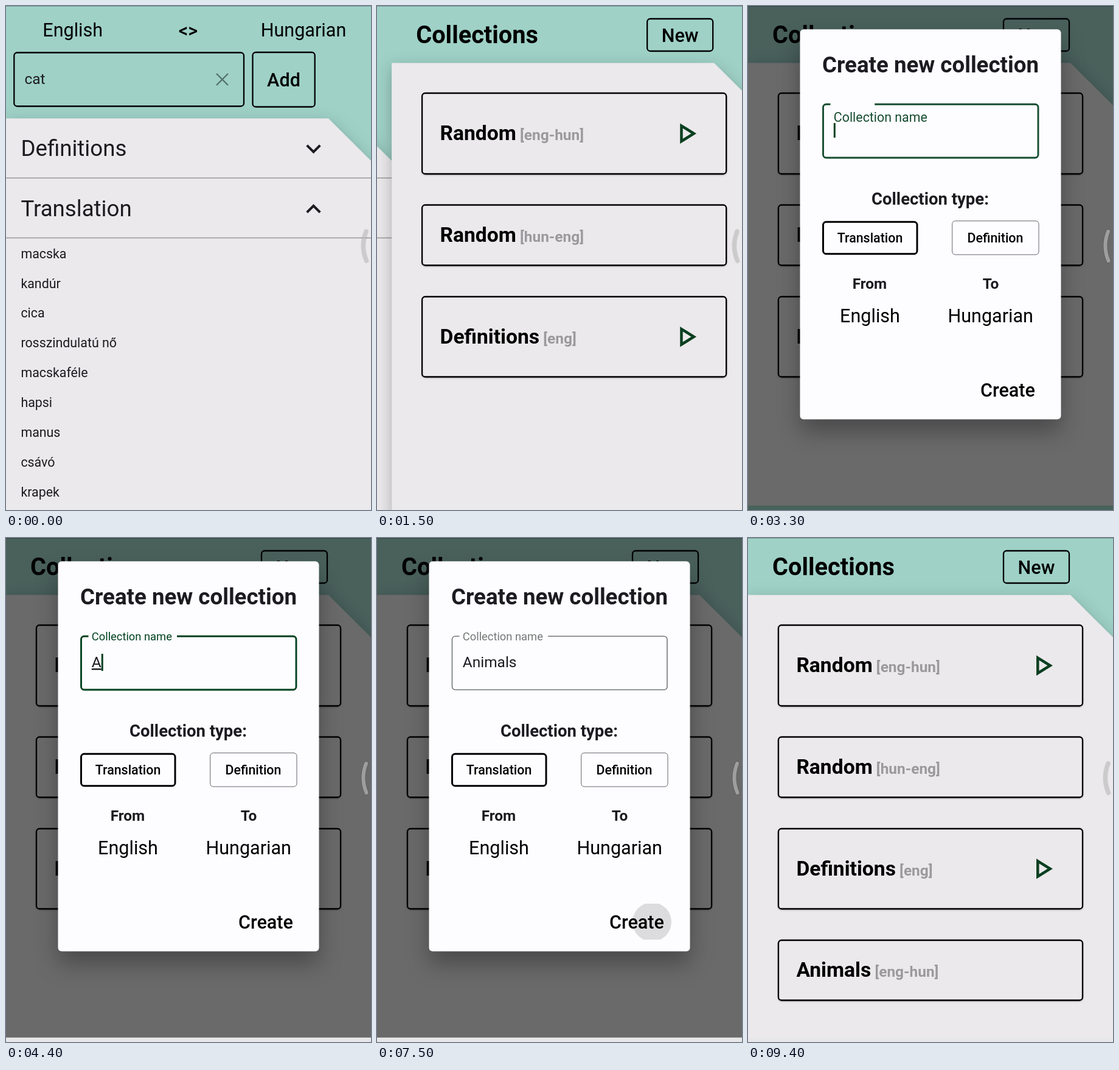
Recreate the animation shown at these times as an HTML page. Size 600 by 827 pixels, loop 10000 ms.

```html
<!DOCTYPE html>
<html lang="en">
<head>
<meta charset="utf-8">
<title>Dictionary collections</title>
<style>
  html, body { margin: 0; width: 100%; height: 100%; overflow: hidden; background: #9fd1c7; }
  svg { display: block; width: 100vw; height: 100vh; font-family: Roboto, "Open Sans", sans-serif; }
  text { white-space: pre; }
  .panel { fill: #ebe9eb; filter: drop-shadow(0 8px 13px rgba(0, 0, 0, .25)); }
  .card { fill: #ebe9eb; filter: drop-shadow(0 1.5px 1px rgba(0, 0, 0, .28)); }
  .sheet { fill: #fdfcff; filter: drop-shadow(0 20px 18px rgba(0, 0, 0, .3)); }
</style>
</head>
<body>
<svg id="stage" viewBox="0 0 600 827" preserveAspectRatio="none"></svg>
<script>
const LOOP = 10000, STEP = 100;
const SP = 600 / 392.7; // one density-independent pixel
const INK = '#1c1b1f', GREEN = [0, 66, 31], GREY = [115, 121, 118], RED = [200, 35, 30];

const text = (str, x, y, sp, { weight = 400, fill = '#000', anchor = 'start', id = '' } = {}) =>
  `<text id="${id}" x="${x}" y="${y}" font-size="${sp * SP}" font-weight="${weight}" fill="${fill}" text-anchor="${anchor}">${str}</text>`;

const box = (x, y, right, bottom, width = 2.3, extra = 'fill="none"', stroke = '#000') =>
  `<rect x="${x}" y="${y}" width="${right - x}" height="${bottom - y}" rx="5" stroke="${stroke}" stroke-width="${width}" ${extra}/>`;

const panel = top => `<path class="panel" d="M0 ${top}H530L600 ${top + 69.5}V900H0Z"/>`;
const mid = { anchor: 'middle' };

const chevron = (y, flip) =>
  `<path transform="translate(505.5 ${y}) scale(2.037 ${flip * 2.037})" fill="${INK}"
    d="M-4.59-3.7L0 .88 4.59-3.7 6-2.3 0 3.7-6-2.3Z"/>`;

function card([name, tag, top, bottom, playable], i) {
  const y = (top + bottom) / 2;
  const label = `${name}<tspan font-size="${16 * SP}" fill="#9b999c"> [${tag}]</tspan>`;
  const play = playable
    ? `<path d="M476.3 ${y - 12.7}L496.7 ${y}L476.3 ${y + 12.7}Z" fill="none" stroke="#0a3f20" stroke-width="4.5"/>` : '';
  return `<g id="card${i}">${box(50, top, 550, bottom, 2.3, 'class="card"')}
    ${text(label, 79.4, y + 11, 22, { weight: 700 })}${play}</g>`;
}

const words = ['macska', 'kandúr', 'cica', 'rosszindulatú nő', 'macskaféle', 'hapsi', 'manus', 'csávó', 'krapek'];
const cards = [
  ['Random', 'eng-hun', 143, 275.5, true],
  ['Random', 'hun-eng', 326.5, 425.5, false],
  ['Definitions', 'eng', 477, 608.5, true],
  ['Animals', 'eng-hun', 660, 758.5, false],
];

const dictionary = `<g id="dictionary">
  ${panel(184.5)}
  ${text('English', 109.7, 50, 20, mid)}
  ${text('&lt;&gt;', 299.5, 50.5, 20, { ...mid, weight: 500 })}
  ${text('Hungarian', 489, 50, 20, mid)}
  ${box(13.3, 76.5, 391, 164.5)}
  ${text('cat', 30.5, 127.5, 16, { fill: INK })}
  <path d="M346 111L365 130M365 111L346 130" stroke="#53706a" stroke-width="2.3"/>
  ${box(405.5, 76, 507.7, 165.5)}
  ${text('Add', 456.5, 132, 20, { ...mid, weight: 500 })}
  ${text('Definitions', 24.4, 246, 24, { fill: INK })}${chevron(234.7, 1)}
  ${text('Translation', 24.4, 344.5, 24, { fill: INK })}${chevron(332.5, -1)}
  <path d="M0 282.3H600M0 380.5H600" stroke="#99979a" stroke-width="1.4"/>
  ${words.map((w, i) => text(w, 24.4, 413.7 + i * 32 * SP, 14, { fill: INK })).join('')}
</g>`;

const collections = `<g id="collections">
  ${panel(93.5)}
  ${text('Collections', 40, 61, 26, { weight: 700 })}
  ${box(420, 21, 528, 74)}
  ${text('New', 474, 58.5, 20, { ...mid, weight: 500 })}
  ${cards.map(card).join('')}
</g>`;

const dialog = `<g id="dialog">
  <rect id="sheet" class="sheet" x="85.5" y="38.3" width="429" height="640" rx="6"/>
  ${text('Create new collection', 300, 108.5, 24, { ...mid, weight: 700, fill: INK })}
  <path id="border" fill="none"/>
  ${text('Collection name', 140.8, 0, 16, { id: 'label' })}
  ${text('', 140.8, 212, 16, { fill: INK, id: 'typed' })}
  <rect id="caret" width="3" fill="#00421f"/>
  <g id="error">
    ${text('Name already exsists with this', 140.8, 274, 12, { fill: '#c8231e' })}
    ${text('settings!', 140.8, 295.4, 12, { fill: '#c8231e' })}
  </g>
  <g id="lower">
    ${text('Collection type:', 299.5, 325.5, 18, { ...mid, weight: 700, fill: INK })}
    ${box(123.5, 354.3, 278, 406.7, 3)}
    ${text('Translation', 200.5, 388.3, 14, { ...mid, weight: 500 })}
    ${box(335.7, 352.7, 478, 408, 1, 'fill="none"', '#66656a')}
    ${text('Definition', 406.5, 388.3, 14, { ...mid, weight: 500 })}
    ${text('From', 200, 464, 16, { ...mid, weight: 700, fill: INK })}
    ${text('To', 399, 464, 16, { ...mid, weight: 700, fill: INK })}
    ${text('English', 200.5, 518.8, 20, mid)}
    ${text('Hungarian', 398.7, 518.8, 20, mid)}
    <circle id="ripple" cx="452" cy="630" clip-path="url(#button)" opacity=".13"/>
    ${text('Create', 382, 641, 20, { weight: 500 })}
  </g>
</g>`;

const handle = 'd="M592 370Q582.5 394 592.5 418" fill="none" stroke-linecap="round"';
document.getElementById('stage').innerHTML = `
  <defs><clipPath id="button"><rect x="370" y="600" width="114" height="59" rx="6"/></clipPath></defs>
  <rect width="600" height="827" fill="#9fd1c7"/>
  ${dictionary}${collections}
  <rect id="scrim" width="600" height="827"/>
  ${dialog}
  <rect id="strip" y="819.7" width="600" height="8"/>
  <path d="M0 .5H600" stroke="#000" stroke-opacity=".25"/>
  <path ${handle} stroke="#000" stroke-opacity=".1" stroke-width="8"/>
  <path ${handle} stroke="#c8c8c8" stroke-opacity=".6" stroke-width="6"/>`;

const $ = id => document.getElementById(id);
const set = (id, attrs) => Object.entries(attrs).forEach(([k, v]) => $(id).setAttribute(k, v));
const show = (id, on) => set(id, { visibility: on ? 'visible' : 'hidden' });
const mix = (a, b, p) => `rgb(${a.map((v, i) => Math.round(v + (b[i] - v) * p))})`;

// Linear interpolation through [time, value] pairs
function track(t, ...keys) {
  if (t <= keys[0][0]) return keys[0][1];
  for (let i = 1; i < keys.length; i++) {
    const [t0, v0] = keys[i - 1], [t1, v1] = keys[i];
    if (t < t1) return v0 + (v1 - v0) * (t - t0) / (t1 - t0);
  }
  return keys[keys.length - 1][1];
}

function swipe(t) {
  if (t >= 2100) return 600;
  if (t <= 1200) return track(t, [1000, 0], [1100, 140], [1200, 357.3]);
  return 600 - 242.7 * Math.exp((1200 - t) / 130);
}

const keyTimes = [4200, 4900, 5300, 5400, 5600, 5700, 5900];

function drawField(t) {
  const focused = t >= 3300 && t < 6300, failed = t >= 8000;
  const float = track(t, [3200, 0], [3400, 1]);
  const tint = failed ? RED : GREY;
  const colour = mix(tint, GREEN, focused ? track(t, [3200, .6], [3400, 1]) : 0);
  set('border', {
    d: `M${135.5 + 145.5 * float} 161.3H472a5 5 0 0 1 5 5V244a5 5 0 0 1-5 5H128.5a5 5 0 0 1-5-5V166.3a5 5 0 0 1 5-5H135.5`,
    stroke: colour, 'stroke-width': focused ? 2.9 : 1.6,
  });
  set('label', { y: 213 - 45.5 * float, 'font-size': (16 - 4 * float) * SP, fill: colour });

  const count = keyTimes.filter(k => t >= k).length;
  const typed = $('typed');
  typed.textContent = 'Animals'.slice(0, count);
  set('typed', { 'text-decoration': focused ? 'underline' : 'none' });
  set('caret', {
    x: 140.8 + (count ? typed.getComputedTextLength() : 0),
    y: count ? 190 : 192, height: count ? 28 : 24,
    opacity: focused && (t < 3800 || t >= 4200) ? 1 : 0,
  });
  set('error', { opacity: track(t, [7900, 0], [8000, .2], [8100, .7]) });
}

function draw(t) {
  const shift = swipe(t);
  show('dictionary', shift < 600);
  show('collections', shift > 0);
  set('dictionary', { transform: `translate(${-shift} 0)` });
  set('collections', { transform: `translate(${600 - shift} 0)` });
  set('card3', { display: t >= 8000 ? 'inline' : 'none' });

  const fade = track(t, [2200, 0], [2300, .12], [2400, .6], [2500, .92], [2600, 1], [8000, 1], [8100, .56], [8200, 0]);
  set('scrim', { opacity: .54 * fade });
  set('dialog', { opacity: fade });
  const grow = t >= 8000 ? 55 : 0;
  set('sheet', { height: 640 + grow });
  set('lower', { transform: `translate(0 ${grow})` });
  set('ripple', { r: track(t, [7100, 0], [8100, 80]) });
  drawField(t);

  set('strip', {
    opacity: t >= 3300 ? 1 : 0,
    fill: mix([71, 98, 90], [231, 230, 232], track(t, [3300, 0], [3600, 1])),
  });
}

const start = performance.now();
function tick() {
  const t = (performance.now() - start) % LOOP;
  draw(Math.floor(t / STEP) * STEP);
  requestAnimationFrame(tick);
}
tick();
</script>
</body>
</html>
```
